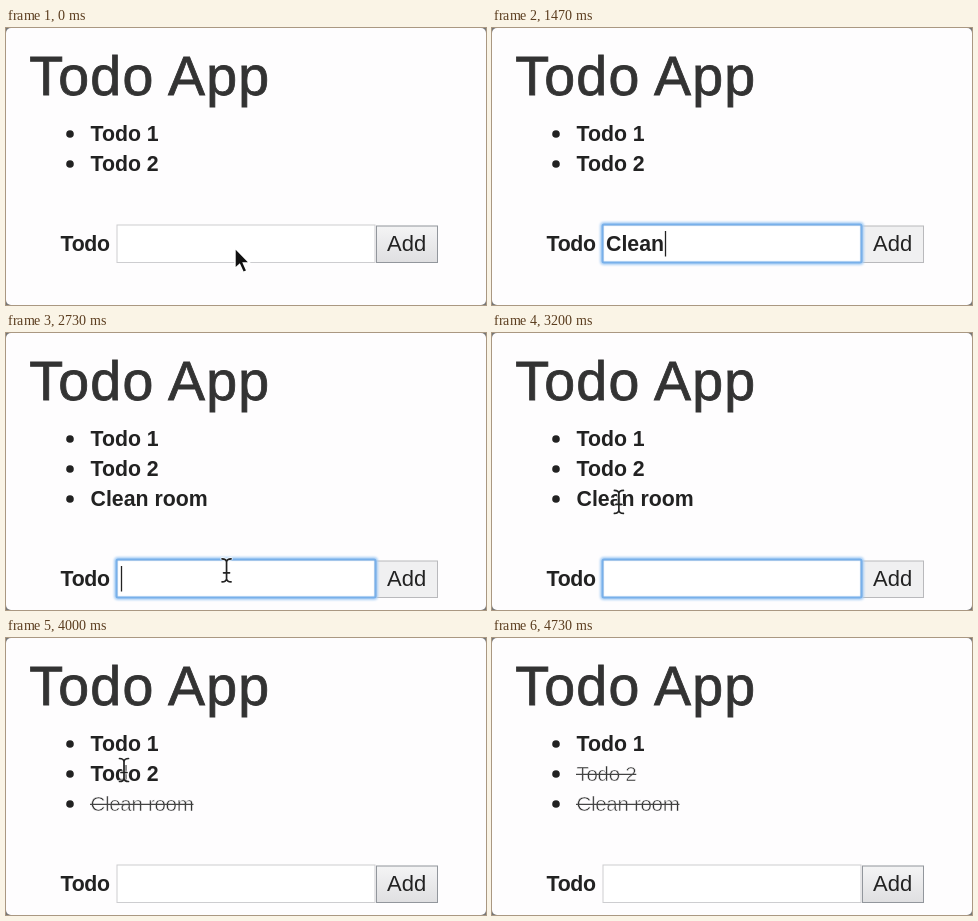
Recreate the animation shown at these times as an HTML page. Size 480 by 277 pixels, loop 5.14 s.

```html
<!DOCTYPE html>
<html lang="en">
<head>
<meta charset="utf-8">
<title>Todo App</title>
<style>
  html, body { margin: 0; width: 100%; height: 100%; overflow: hidden; background: #777; }
  svg { display: block; width: 100%; height: 100%; }
  text { font-family: "Liberation Sans", Arial, sans-serif; fill: #222; white-space: pre; }
  .title { font-size: 55.5px; letter-spacing: 1.2px; fill: #333; stroke: #333; stroke-width: .8px; }
  .bold { font-size: 21.3px; font-weight: 700; }
  .label { letter-spacing: -.3px; }
  .add { font-size: 22px; }
  .done { font-size: 20.5px; letter-spacing: -.3px; fill: #333; stroke: #fefdfe; stroke-width: .6px; }
</style>
</head>
<body>
<svg viewBox="0 0 480 277">
  <defs>
    <linearGradient id="face" x2="0" y2="1">
      <stop stop-color="#f4f4f5"/><stop offset="1" stop-color="#dfdfe1"/>
    </linearGradient>
    <filter id="soft" x="-10%" y="-30%" width="120%" height="160%"><feGaussianBlur stdDeviation=".8"/></filter>
  </defs>
  <rect width="480" height="277" rx="5" fill="#fefdfe"/>
  <text class="title" x="23.3" y="67">Todo App</text>
  <g id="list"></g>
  <g id="form">
    <text class="bold label" x="54.5" y="223">Todo</text>
    <rect id="button" x="370.5" y="198" width="61" height="36.5"/>
    <text class="add" x="381" y="223">Add</text>
    <rect x="111" y="197" width="258" height="37.5" fill="#fff" stroke="#cdcdd0"/>
    <g id="ring" fill="none">
      <rect x="109.5" y="195.5" width="261" height="40" rx="2.5" stroke="#a9cff5" stroke-width="3" filter="url(#soft)"/>
      <rect x="110.5" y="196.5" width="259" height="38" rx="1.5" stroke="#78b0ea" stroke-width="2"/>
    </g>
    <text id="entry" class="bold" x="114" y="223"></text>
    <path id="caret" stroke="#222" stroke-width="1.3"/>
  </g>
  <path id="arrow" d="M0 0V20.5L4.6 16.3L8.2 24.4L11.8 22.8L8.3 14.9H14.6Z" fill="#111" stroke="#fff" stroke-width="1.4"/>
  <g id="beam" fill="none" stroke-linecap="round">
    <path d="M-4.5 -11.5Q-.5 -11.5 0 -8.5Q.5 -11.5 4.5 -11.5M0 -8.5V8.5M-4.5 11.5Q-.5 11.5 0 8.5Q.5 11.5 4.5 11.5M-3 2.5H3" stroke="#fff" stroke-width="3.4" opacity=".75"/>
    <path d="M-4.5 -11.5Q-.5 -11.5 0 -8.5Q.5 -11.5 4.5 -11.5M0 -8.5V8.5M-4.5 11.5Q-.5 11.5 0 8.5Q.5 11.5 4.5 11.5M-3 2.5H3" stroke="#222" stroke-width="1.7"/>
  </g>
</svg>
<script>
const LOOP = 5140, FOCUS = 400, ENTER = 2400, BLUR = 3400;
const HIDE = 870, SHOW = 2730, LEAVE = 4530;
const items = [
  { text: "Todo 1", done: Infinity, from: 0 },
  { text: "Todo 2", done: 4130, from: 0 },
  { text: "Clean room", done: BLUR, from: ENTER }
];
const typing = [[870, "C"], [1070, "Cl"], [1270, "Cle"], [1470, "Clean"], [1530, "Clean "],
  [1670, "Clean r"], [1870, "Clean ro"], [2070, "Clean roo"], [2200, "Clean room"]];
const path = [[130, 229, 220], [330, 226, 221], [2670, 226, 240], [2800, 214, 234], [3130, 127, 169],
  [3470, 126, 168], [3730, 120, 145], [3930, 118, 132], [4130, 118, 132],
  [4230, 113, 119], [4310, 113, 120], [4530, 178, 290]];

const $ = id => document.getElementById(id);
const show = (el, on) => el.setAttribute("visibility", on ? "visible" : "hidden");
const move = (el, x, y) => el.setAttribute("transform", `translate(${x} ${y})`);

function add(parent, tag, attrs, text = "") {
  const el = document.createElementNS("http://www.w3.org/2000/svg", tag);
  for (const key in attrs) el.setAttribute(key, attrs[key]);
  el.textContent = text;
  return parent.appendChild(el);
}

items.forEach((item, i) => {
  const y = 105.5 + 30 * i;
  item.dot = add($("list"), "circle", { cx: 64, cy: y + .5, r: 3.8, fill: "#222" });
  item.open = add($("list"), "text", { class: "bold", x: 84.5, y: y + 7.3 }, item.text);
  item.light = add($("list"), "text", { class: "done", x: 84.5, y: y + 7.3 }, item.text);
  const end = 84.5 + item.light.getComputedTextLength();
  item.strike = add($("list"), "path", { d: `M84 ${y + .9}H${end}`, stroke: "#444", "stroke-width": 1.4 });
});

function pointerAt(t) {
  const next = path.findIndex(p => p[0] > t);
  if (next === 0) return path[0].slice(1);
  if (next < 0) return path[path.length - 1].slice(1);
  const [t0, x0, y0] = path[next - 1], [t1, x1, y1] = path[next];
  const u = (t - t0) / (t1 - t0), k = u * u * (3 - 2 * u);
  return [x0 + (x1 - x0) * k, y0 + (y1 - y0) * k];
}

function drawForm(t) {
  const focused = t >= FOCUS && t < BLUR;
  const typed = typing.filter(s => s[0] <= t).pop();
  const value = typed && t < ENTER ? typed[1] : "";
  move($("form"), 0, t < ENTER ? 0 : 30);
  show($("ring"), focused);
  $("button").setAttribute("fill", focused ? "#f0f0f1" : "url(#face)");
  $("button").setAttribute("stroke", focused ? "#b9b9bc" : "#92969c");
  $("entry").textContent = value;

  const lastKey = t >= ENTER ? ENTER : typed ? typed[0] : FOCUS;
  const x = 115.5 + (value ? $("entry").getComputedTextLength() : 0);
  $("caret").setAttribute("d", `M${x} 203V228.5`);
  show($("caret"), focused && (t - lastKey) % 1000 < 500);
}

function drawPointer(t) {
  const [x, y] = pointerAt(t);
  const visible = t < HIDE || (t >= SHOW && t < LEAVE);
  const arrow = t < 200 || (t >= SHOW && y > 182 && y < 226) || (t > BLUR && y > 182);
  move($("arrow"), x, y);
  move($("beam"), x, y);
  show($("arrow"), visible && arrow);
  show($("beam"), visible && !arrow);
}

function render(t) {
  for (const item of items) {
    const on = t >= item.from, done = t >= item.done;
    show(item.dot, on);
    show(item.open, on && !done);
    show(item.light, done);
    show(item.strike, done);
  }
  drawForm(t);
  drawPointer(t);
}

const start = performance.now();
function tick() {
  render((performance.now() - start) % LOOP);
  requestAnimationFrame(tick);
}
tick();
</script>
</body>
</html>
```
